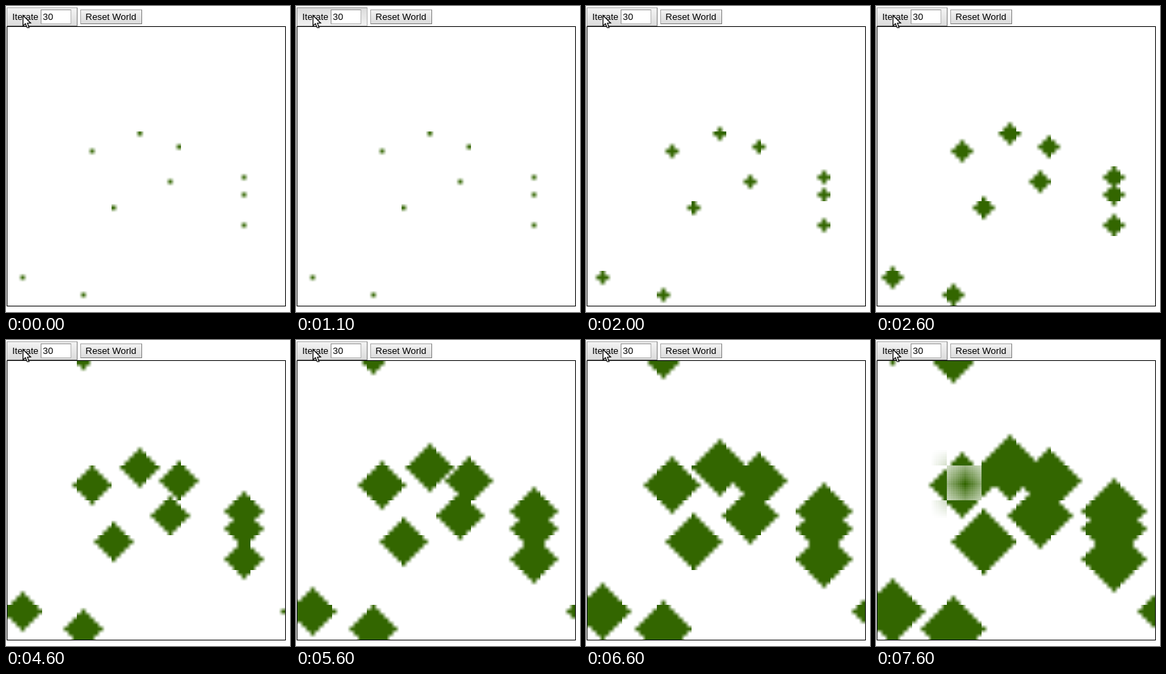
These frames come from a looping animation (409 by 439 pixels, 8 s). An HTML page with a canvas:

```html
<!DOCTYPE html>
<html lang="en">
<head>
<meta charset="utf-8">
<title>Growing cells</title>
<style>
  html, body { margin: 0; width: 409px; height: 439px; overflow: hidden; background: #fff; }
  body { position: relative; font: 13.333px/15px "Liberation Sans", Arial, sans-serif; color: #000; }
  body > *, .field { position: absolute; box-sizing: border-box; }
  .button {
    border: 1px solid; border-color: #a9a9a9 #808080 #808080 #a9a9a9;
    background: linear-gradient(#f3f3f3, #dcdcdc); white-space: nowrap;
  }
  .button.down { border-color: #909090 #b4b4b4 #b4b4b4 #909090; background: linear-gradient(#dcdcdc, #f1f1f1); }
  #iterate { left: 1px; top: 2px; width: 102px; height: 27px; padding: 5px 7px; }
  #reset { left: 107px; top: 5px; width: 89px; height: 21px; padding: 2px 6.5px; }
  .field {
    left: 48px; top: 2px; width: 44px; height: 21px; padding: 2px;
    border: 1px solid; border-color: #8f8f8f #b5b5b5 #b5b5b5 #8f8f8f; background: #fff;
  }
  #world { left: 1px; top: 29px; width: 402px; height: 402px; border: 1px solid #000; }
  #pointer { left: 23px; top: 12px; }
</style>
</head>
<body>
  <div class="button" id="iterate">Iterate<span class="field">30</span></div>
  <div class="button" id="reset">Reset World</div>
  <canvas id="world" width="400" height="400"></canvas>
  <svg id="pointer" width="15" height="22" viewBox="0 0 15 22">
    <path d="M1.5 1.5V16.5L5 13.3L7.4 19H10.2L7.9 12.5H12.5Z" fill="#fff" stroke="#000" stroke-width="1.2"/>
  </svg>
<script>
const LOOP = 8000, SIZE = 64, CELLS = 8, TILE = 50;
const COLOR = '#336600';
const PRESS = [1100, 1300];
const STEPS = [2000, 2600, 3500, 4600, 5600, 6600, 7600];
const SEEDS = [[30, 24], [39, 27], [19, 28], [54, 34], [37, 35],
               [54, 38], [24, 41], [54, 45], [3, 57], [17, 61]];

const iterate = document.getElementById('iterate');
const ctx = document.getElementById('world').getContext('2d');
ctx.imageSmoothingEnabled = true;

function bitmap(size, filled) {
  const c = document.createElement('canvas');
  c.width = c.height = size;
  const g = c.getContext('2d');
  g.fillStyle = COLOR;
  let count = 0;
  for (let y = 0; y < size; y++)
    for (let x = 0; x < size; x++)
      if (filled(x, y)) { g.fillRect(x, y, 1, 1); count++; }
  return { c, count };
}

// Distance on a world whose edges wrap around
const gap = (a, b) => {
  const d = Math.abs(a - b);
  return Math.min(d, SIZE - d);
};
const alive = (x, y, radius) =>
  SEEDS.some(([sx, sy]) => gap(x, sx) + gap(y, sy) <= radius);

const glow = bitmap(3, (x, y) => x === 1 && y === 1).c;

function drawWorld(radius) {
  const tiles = [];
  for (let row = 0; row < CELLS; row++)
    for (let col = 0; col < CELLS; col++) {
      const { c, count } = bitmap(CELLS, (x, y) =>
        alive(col * CELLS + x, row * CELLS + y, radius));
      if (count) tiles.push({ c, x: col * TILE, y: row * TILE, full: count === CELLS * CELLS });
    }
  ctx.fillStyle = '#fff';
  ctx.fillRect(0, 0, 400, 400);
  // A full tile collapses into one smoothed cell that spills into empty neighbours
  for (const t of tiles)
    if (t.full) ctx.drawImage(glow, t.x - TILE, t.y - TILE, 3 * TILE, 3 * TILE);
  for (const t of tiles)
    if (!t.full) {
      ctx.fillRect(t.x, t.y, TILE, TILE);
      ctx.drawImage(t.c, t.x, t.y, TILE, TILE);
    }
}

let shown = -1;
const start = performance.now();

function render(now) {
  const t = Math.max(0, now - start) % LOOP;
  iterate.classList.toggle('down', t >= PRESS[0] && t < PRESS[1]);
  const radius = STEPS.filter(s => t >= s).length;
  if (radius !== shown) drawWorld(shown = radius);
  requestAnimationFrame(render);
}
render(start);
</script>
</body>
</html>
```
